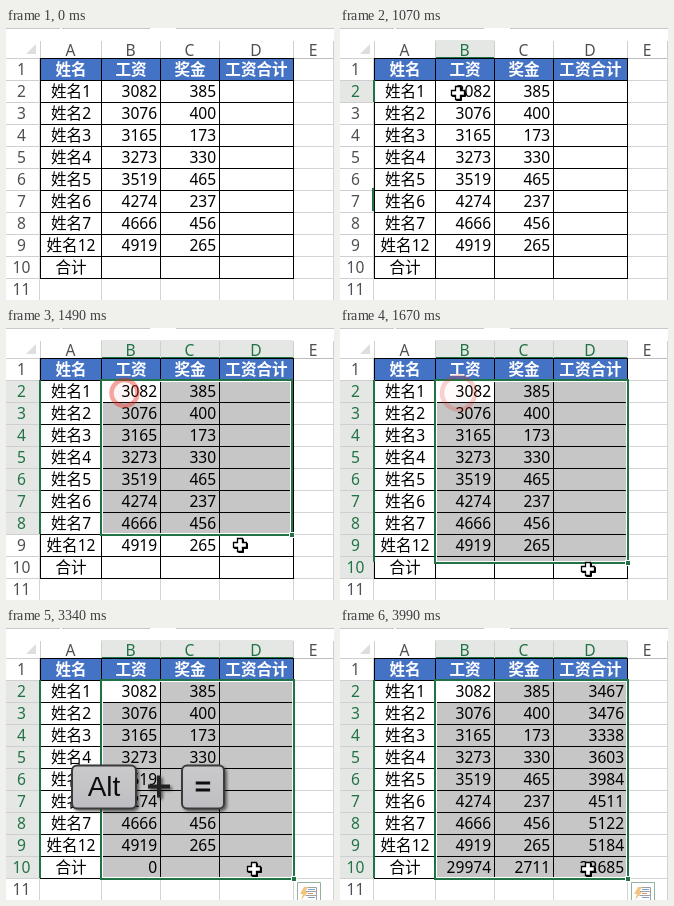
An HTML page that plays this animation: 328x272 px, repeating every 4.42 s.

```html
<!DOCTYPE html>
<html lang="zh-CN">
<head>
<meta charset="utf-8">
<title>Alt + =</title>
<style>
html, body { margin: 0; width: 100%; height: 100%; overflow: hidden; background: #fff; }
svg { display: block; width: 328px; height: 272px; }
text { font: 15.6px "Noto Sans", "Open Sans", "Noto Sans CJK SC", "Noto Sans CJK", sans-serif; }
.mid { text-anchor: middle; }
.end { text-anchor: end; }
.bold { font-weight: 700; fill: #fff; }
.key text { font: 28px "Liberation Sans", Arial, sans-serif; text-anchor: middle; fill: #111; }
</style>
</head>
<body>
<svg id="stage" viewBox="0 0 328 272">
  <defs>
    <linearGradient id="cap" x2="0" y2="1">
      <stop offset="0" stop-color="#cacacc"/>
      <stop offset="1" stop-color="#bebec2"/>
    </linearGradient>
    <filter id="soft" x="-20%" y="-20%" width="150%" height="150%">
      <feDropShadow dx="2" dy="2" stdDeviation="1.4" flood-color="#000" flood-opacity=".55"/>
    </filter>
  </defs>
</svg>
<script>
const LOOP = 4420, GREEN = '#217346', HEAD = '#505050', LIT = '#e5e7e4', LINE = '#d4d4d4';
const X = [34, 95, 154, 213, 287, 327];
const rowTop = n => 30 + 22 * (n - 1);
const pay = [3082, 3076, 3165, 3273, 3519, 4274, 4666, 4919];
const bonus = [385, 400, 173, 330, 465, 237, 456, 265];
const sum = list => list.reduce((a, b) => a + b, 0);
const stage = document.getElementById('stage');

function add(tag, attrs, parent = stage, label) {
  const el = document.createElementNS('http://www.w3.org/2000/svg', tag);
  set(el, attrs);
  if (label !== undefined) el.textContent = label;
  parent.append(el);
  return el;
}
function set(el, attrs) {
  for (const k in attrs) el.setAttribute(k, attrs[k]);
}
const show = (el, on) => set(el, { visibility: on ? 'visible' : 'hidden' });
const box = (x, y, width, height, fill, more) => add('rect', { x, y, width, height, fill, ...more });
const write = (label, x, y, cls, fill = '#000') => add('text', { x, y, class: cls, fill }, stage, label);
const midX = c => (X[c] + X[c + 1]) / 2;

// Sheet frame and headers
box(0, 0, 328, 272, '#fff');
box(0, 0, 54, 1, '#c9c9c9');
box(56, 0, 88, 1, '#c9c9c9');
box(170, 0, 158, 1, '#c9c9c9');
add('path', { d: 'M30 16V26H20Z', fill: '#dedede' });

const cols = [...'ABCDE'].map((name, c) => ({
  bg: box(X[c], 12, X[c + 1] - X[c], 18, LIT),
  edge: box(X[c], 29, X[c + 1] - X[c] + 1, 2, GREEN),
  label: write(name, midX(c), 27.5, 'mid', HEAD)
}));
const rows = Array.from({ length: 11 }, (_, i) => ({
  bg: box(0, rowTop(i + 1), 33, 22, LIT),
  label: write(i + 1, 15.5, rowTop(i + 1) + 17, 'mid', HEAD)
}));
for (const x of X) box(x, 13, 1, 17, '#cfcfcf');
for (let n = 1; n <= 11; n++) {
  box(0, rowTop(n), 33, 1, '#cfcfcf');
  box(X[4], rowTop(n), 41, 1, LINE);
}
box(33, 30, 1, 242, LINE);
box(33, 30, 295, 1, '#bdbdbd');
for (const x of X.slice(1)) box(x, 250, 1, 22, LINE);
box(X[5], 30, 1, 220, LINE);
box(34, 30, 253, 22, '#4472c4');

// Selection fill lies under the borders and text
const fill = box(95, 52, 0, 0, '#c6c6c6');
const active = box(96, 53, 58, 21, '#fff');
for (let n = 1; n <= 11; n++) box(34, rowTop(n), 254, 1, '#000');
for (const x of X.slice(0, 5)) box(x, 30, 1, 221, '#000');
const rowEdge = box(33, 52, 2, 22, GREEN);
const oldEdge = box(32, 160, 2, 23, GREEN);

['姓名', '工资', '奖金', '工资合计'].forEach((s, c) => write(s, midX(c) + .5, 47, 'mid bold', '#fff'));
const number = (v, c, n) => write(v, X[c + 1] - 2.8, rowTop(n) + 17, 'end');
const results = [];
pay.forEach((p, i) => {
  write('姓名' + (i === 7 ? 12 : i + 1), midX(0) + .5, rowTop(i + 2) + 17, 'mid');
  number(p, 1, i + 2);
  number(bonus[i], 2, i + 2);
  results.push(number(p + bonus[i], 3, i + 2));
});
write('合计', midX(0) + .5, rowTop(10) + 17, 'mid');
const total = number('', 1, 10);
results.push(number(sum(bonus), 2, 10), number(sum(pay) + sum(bonus), 3, 10));

const inner = box(96.5, 53.5, 0, 0, 'none', { stroke: '#fff' });
const frame = box(95, 52, 0, 0, 'none', { stroke: GREEN, 'stroke-width': 2 });
const handle = box(0, 0, 5, 5, GREEN, { stroke: '#fff' });

// Quick analysis button
const tool = add('g', {});
const part = (d, attrs) => add('path', { d, fill: 'none', ...attrs }, tool);
part('M291.5 254.5H314.5V275H291.5Z', { fill: '#fff', stroke: '#8fb39d' });
part('M299.5 259.5H310.5V272M299.5 263.5H310.5M299.5 267.5H310.5', { stroke: '#a0a0a0' });
part('M302 261.5H309', { stroke: '#7f9fd6' });
part('M302 265.5H307', { stroke: '#e0907f' });
part('M302 269.5H309', { stroke: '#7f9fd6' });
part('M298 259H302L299 264H302L295 272L297 266H294Z', { fill: '#f5c47c' });

// Click ring and pointer
const ring = add('circle', { cx: 118.5, cy: 65, fill: '#f04030', 'fill-opacity': .1, stroke: '#e8281c', 'stroke-width': 4.5 });
const pointer = add('g', {});
const cross = 'M-2.5 -6.5H2.5V-2.5H6.5V2.5H2.5V6.5H-2.5V2.5H-6.5V-2.5H-2.5Z';
add('path', { d: cross, transform: 'translate(1 1)', fill: '#000', stroke: '#000' }, pointer);
add('path', { d: cross, fill: '#fff', stroke: '#000', 'stroke-width': 1.3 }, pointer);

// Key caps
const keys = add('g', { class: 'key', filter: 'url(#soft)' });
function cap(x, width, label, weight) {
  add('rect', { x, y: 137.5, width, height: 43, rx: 5, fill: 'url(#cap)', stroke: '#3a3a3a', 'stroke-width': 2 }, keys);
  add('text', { x: x + width / 2, y: 168, stroke: '#111', 'stroke-width': weight }, keys, label);
}
cap(66, 64, 'Alt', 0);
cap(176, 42, '=', .8);
add('path', { d: 'M142 158.5H164M153 147.5V169.5', stroke: '#222', 'stroke-width': 4 }, keys);

// Tables of [time, value]
const track = {
  x: [[840, 118], [1130, 118], [1310, 210], [1490, 234], [1580, 241], [1670, 248]],
  y: [[840, 65], [1130, 65], [1310, 183], [1490, 217], [1580, 231], [1670, 241]],
  right: [[1190, 154], [1310, 196], [1400, 248], [1490, 285], [1550, 287]],
  bottom: [[1160, 74], [1310, 133], [1490, 206], [1580, 227], [1640, 229], [1760, 250]],
  ring: [[1130, 7], [1310, 9.5], [1490, 13], [1850, 20]],
  glow: [[1130, .95], [1310, .85], [1490, .42], [1850, 0]]
};
function at(name, t) {
  const k = track[name];
  if (t <= k[0][0]) return k[0][1];
  for (let i = 1; i < k.length; i++) {
    const [t0, a] = k[i - 1], [t1, b] = k[i];
    if (t < t1) return a + (b - a) * (t - t0) / (t1 - t0);
  }
  return k[k.length - 1][1];
}
const ease = p => p * p * (3 - 2 * p);

function step(t) {
  if (t < 330) return 0;
  const from = t < 1070 ? 330 : 1070;
  return from + Math.floor((t - from) / 30) * 30;
}

function draw(time) {
  const t = step(time);

  let x = at('x', t), y = at('y', t);
  if (t < 840) {
    const p = ease(Math.max(0, t - 330) / 510);
    x = 282 - 164 * p;
    y = 250 - 185 * p;
  }
  show(pointer, t >= 330);
  set(pointer, { transform: `translate(${Math.round(x)} ${Math.round(y)})` });

  const picked = t >= 1070, framed = t >= 1100;
  const right = Math.round(at('right', t)), bottom = Math.round(at('bottom', t));
  const width = right - 95, height = bottom - 52;
  set(fill, { width, height });
  set(frame, { width: width + 1, height: height + 1 });
  set(inner, { width: width - 2, height: height - 2 });
  set(handle, { x: right - 1.5, y: bottom - 1.5 });
  set(rowEdge, { height });
  [fill, active, inner, frame, handle].forEach(el => show(el, framed));
  show(rowEdge, picked);
  show(oldEdge, picked && !framed);

  cols.forEach((c, i) => {
    const on = picked && i > 0 && X[i] < right;
    show(c.bg, on);
    show(c.edge, on);
    set(c.label, { fill: on ? GREEN : HEAD });
  });
  rows.forEach((r, i) => {
    const on = picked && i > 0 && rowTop(i + 1) < bottom;
    show(r.bg, on);
    set(r.label, { fill: on ? GREEN : HEAD });
  });

  show(ring, t >= 1130 && t < 1850);
  set(ring, { r: at('ring', t), opacity: at('glow', t) });

  const done = time >= 3400;
  results.forEach(el => show(el, done));
  total.textContent = done ? sum(pay) : time >= 3340 ? '0' : '';

  show(tool, time >= 2050 && !(done && time < 3460));
  set(tool, { opacity: time < 2110 || (done && time < 3490) ? .5 : 1 });
  show(keys, time >= 2180 && time < 3990);
}

const start = performance.now();
function tick() {
  draw((performance.now() - start) % LOOP);
  requestAnimationFrame(tick);
}
tick();
</script>
</body>
</html>
```
